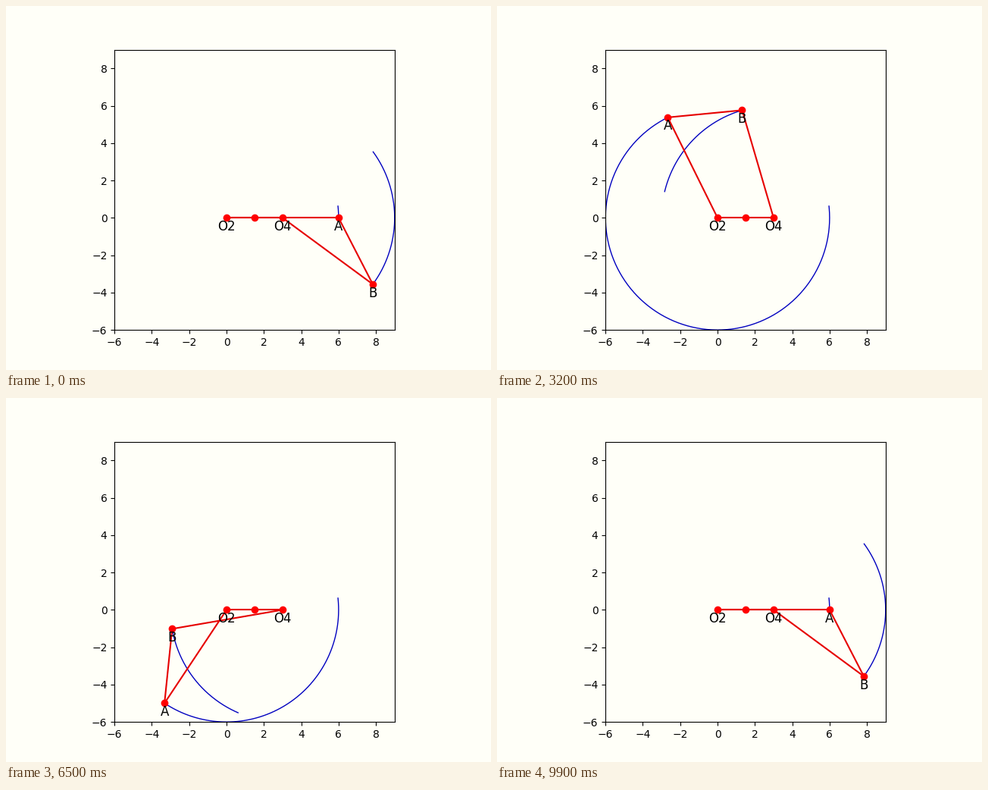
These frames come from a looping animation (640 px wide and 480 px high, 10000 ms). A matplotlib script:

```python
import numpy as np
import matplotlib.pyplot as plt
from matplotlib.animation import FuncAnimation

FRAMES, INTERVAL = 100, 100
GROUND, CRANK, COUPLER, ROCKER = 3, 6, 4, 6
LABEL_DROP = 0.47
PAPER = "#fffff8"
TRACE = "#0000c0"
LINK = "#e60000"

O2 = np.array([0.0, 0.0])
O4 = np.array([GROUND, 0.0])
MID = (O2 + O4) / 2
CRANK_STOP = np.radians(2 * np.pi)  # where the crank trace always ends

fig = plt.figure(figsize=(6.4, 4.8), dpi=100, facecolor=PAPER)
ax = fig.add_subplot(facecolor=PAPER, aspect="equal")
ax.set(xlim=(-6, 9), ylim=(-6, 9))
ax.set_xticks(range(-6, 9, 2))
ax.set_yticks(range(-6, 9, 2))


def polar(center, radius, angle):
    return center + radius * np.array([np.cos(angle), np.sin(angle)])


def arc(center, radius, start, span):
    angles = np.linspace(start, start + span, 200)
    return center[0] + radius * np.cos(angles), center[1] + radius * np.sin(angles)


def trace():
    return ax.plot([], [], color=TRACE, lw=1, zorder=1, solid_capstyle="butt")[0]


def link():
    return ax.plot([], [], color=LINK, lw=1.5)[0]


def label(name, point=(0, 0)):
    return ax.text(point[0], point[1] - LABEL_DROP, name, fontsize=12,
                   ha="center", va="center")


crank_trace, rocker_trace = trace(), trace()
links = [link() for _ in range(4)]
joints, = ax.plot([], [], "ro", ms=6, zorder=2.2)
label("O2", O2)
label("O4", O4)
label_a, label_b = label("A"), label("B")


def update(i):
    theta = 2 * np.pi * i / (FRAMES - 1)
    a = polar(O2, CRANK, theta)

    # Law of cosines in the triangle O4-A-B
    dx, dy = a - O4
    d = np.hypot(dx, dy)
    alpha = np.arccos((ROCKER**2 + d**2 - COUPLER**2) / (2 * ROCKER * d))
    phi = np.arctan2(dy, dx) - alpha
    b = polar(O4, ROCKER, phi)

    for line, ends in zip(links, ((O2, O4), (O2, a), (a, b), (b, O4))):
        line.set_data(*np.transpose(ends))
    joints.set_data(*np.transpose([O2, MID, O4, a, b]))
    crank_trace.set_data(*arc(O2, CRANK, theta, (CRANK_STOP - theta) % (2 * np.pi)))
    rocker_trace.set_data(*arc(O4, ROCKER, phi, 2 * alpha))
    for text, point in ((label_a, a), (label_b, b)):
        text.set_position((point[0], point[1] - LABEL_DROP))
    return *links, joints, crank_trace, rocker_trace, label_a, label_b


anim = FuncAnimation(fig, update, frames=FRAMES, interval=INTERVAL,
                     repeat=True, repeat_delay=0)
plt.show()
```
